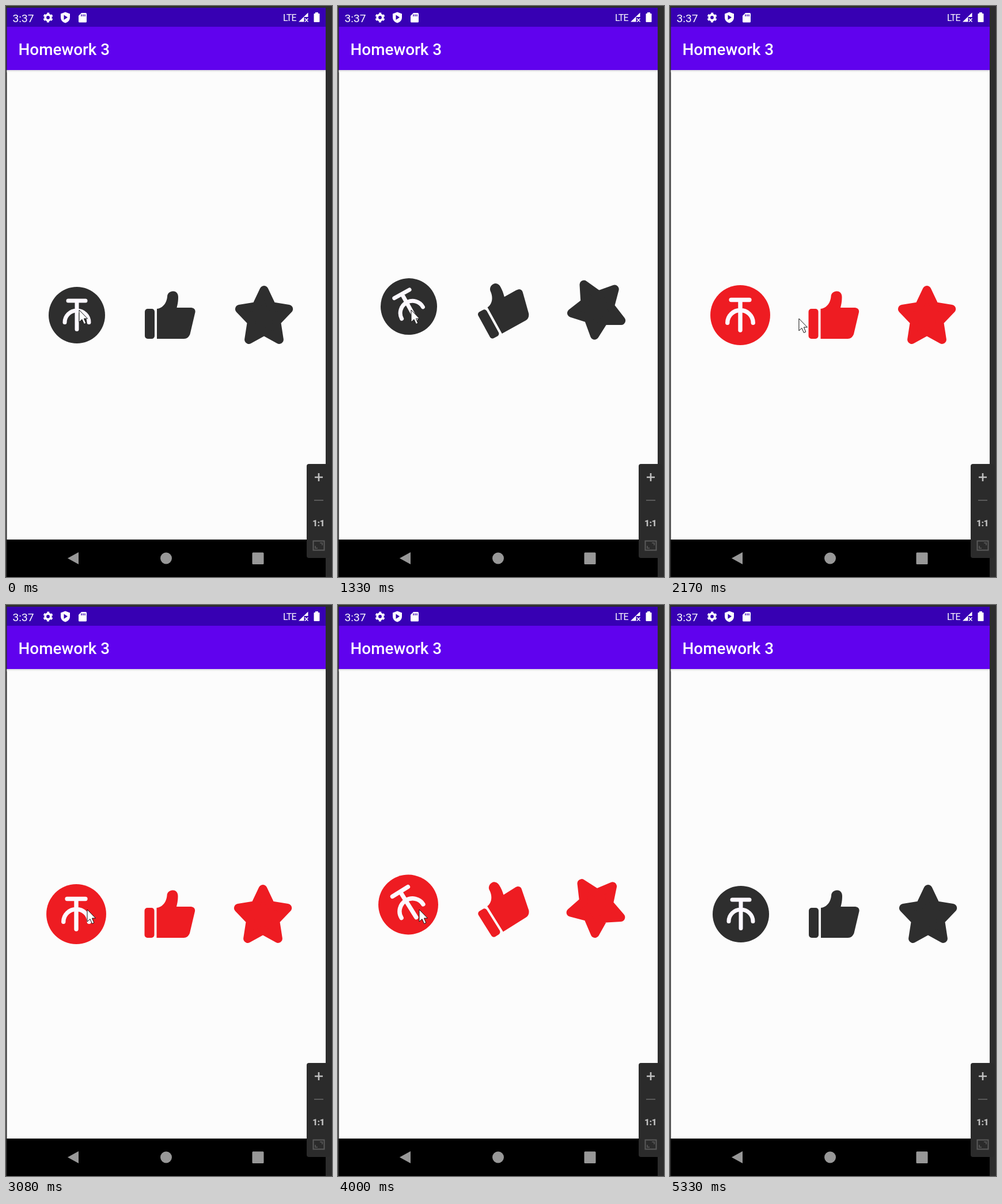
Write an HTML page that moves like this. It is 566 px wide and 990 px high and loops after 5580 ms.

```html
<!DOCTYPE html>
<html lang="en">
<head>
<meta charset="utf-8">
<style>
  html, body { margin: 0; height: 100%; overflow: hidden; background: #2d2d2d; }
  svg { display: block; width: 566px; height: 990px; font-family: Roboto, sans-serif; }
</style>
</head>
<body>
<svg viewBox="0 0 566 990">
  <defs>
    <linearGradient id="shade" x2="0" y2="1">
      <stop stop-color="#d9d9dc"/>
      <stop offset="1" stop-color="#fcfcfc"/>
    </linearGradient>
  </defs>

  <!-- Screen -->
  <rect x="1.500" y="3" width="553.500" height="33" fill="#3700b3"/>
  <rect x="1.500" y="36" width="553.500" height="75" fill="#6002ee"/>
  <rect x="1.500" y="111" width="553.500" height="814" fill="#fcfcfc"/>
  <rect x="1.500" y="111" width="553.500" height="4" fill="url(#shade)"/>
  <rect x="1.500" y="925.500" width="553.500" height="64.500"/>

  <!-- Status bar -->
  <g fill="#fff">
    <text x="11.500" y="27.500" font-size="19.200">3:37</text>
    <g fill="none" stroke="#fff">
      <circle cx="73" cy="20" r="4.800" stroke-width="3.800"/>
      <circle cx="73" cy="20" r="7.200" stroke-width="2.600" stroke-dasharray="3.8 3.74" stroke-dashoffset="5.670"/>
    </g>
    <path d="M103 10.500l8 3V19.500C111 24.500 108 28 103 29.500C98 28 95 24.500 95 19.500V13.500Z"/>
    <path d="M100.500 15.500L107 19.800L100.500 24Z" fill="#3700b3"/>
    <path d="M131 12h7.500q1.500 0 1.500 1.500v13.500q0 1.500-1.500 1.500h-11q-1.500 0-1.500-1.500V17Z"/>
    <path d="M131 14.500v3.500M134 14.500v3.500M137 14.500v3.500" stroke="#3700b3" stroke-width="1.400"/>
    <text x="481" y="26" font-size="16" letter-spacing="-.8">LTE</text>
    <path d="M508 27.500L524.500 11.500V19H517.500V27.500Z"/>
    <path d="M519 21.500l5.500 6m0-6l-5.500 6" stroke="#fff" stroke-width="1.500"/>
    <path d="M537 11h5v2h1.500q1 0 1 1v13q0 1-1 1h-8q-1 0-1-1v-13q0-1 1-1h1.500Z"/>
    <text x="21.500" y="84.500" font-size="27.900" font-weight="500">Homework 3</text>
  </g>

  <!-- Icons, each drawn around its own centre -->
  <g id="icons">
    <g>
      <circle r="49"/>
      <path d="M-15-25H15M0-25V24.500M-21 12.500A21 20.500 0 0 1 21 12.500"
            fill="none" stroke="#fcf8ff" stroke-width="7" stroke-linecap="round"/>
    </g>
    <g>
      <rect x="-44" y="-11" width="17" height="52" rx="5"/>
      <path d="M-23-11C-13-12-6-21-5-32C-5-38 0-41.500 5-41.500C11-41.500 14-37 14-31C14-24 13-19 11.500-13H35C42-13 45-9 43-3L34.500 33C32.500 38 29 41 24 41H-23Z"/>
    </g>
    <g><path id="star" stroke-width="15" stroke-linejoin="round"/></g>
  </g>

  <!-- Navigation bar -->
  <g fill="#989898">
    <path d="M107 957.500L126 947V968Z"/>
    <circle cx="278" cy="957.500" r="10"/>
    <rect x="427.500" y="947.500" width="20" height="20.500" rx="1.500"/>
  </g>

  <!-- Zoom panel -->
  <rect x="522" y="794" width="40.500" height="163" rx="4" fill="#2b2b2b"/>
  <g fill="none" stroke="#5a5a5a" stroke-width="2">
    <path d="M536 817h14M543 810v14" stroke="#c0c0c0" stroke-width="2.600"/>
    <path d="M535 857h16"/>
    <rect x="533.500" y="927.500" width="19" height="16"/>
    <path d="M537 936v4h4M545 931h4v4" stroke-width="1.600"/>
  </g>
  <text x="542.500" y="901.500" font-size="15.500" font-weight="900" fill="#c0c0c0" text-anchor="middle" letter-spacing="-.5">1:1</text>

  <path id="cursor" d="M0 0V21L5 16.500L8.500 24.500L11.800 23L8.500 15H14.500Z" fill="#fff" stroke="#111"/>
</svg>
<script>
const LOOP = 5580, STEP = 250 / 3;
const icons = document.getElementById('icons');
const cursor = document.getElementById('cursor');

// Star with rounded tips, a little taller than wide and below its pivot
document.getElementById('star').setAttribute('d', 'M' + Array.from({ length: 10 }, (_, i) => {
  const r = i % 2 ? 24 : 47.5, a = i * Math.PI / 5;
  return [0.945 * r * Math.sin(a), 4 - r * Math.cos(a)].map(v => v.toFixed(2));
}).join('L') + 'Z');

// Pointer path: time, x, y
const path = [
  [0, 127, 527], [1840, 127, 527], [2000, 160, 532], [2167, 224, 542],
  [2280, 238, 554], [2400, 205, 546], [2600, 141, 528], [4167, 141, 528],
  [4500, 301, 835], [4600, 301, 835], [4750, 392, 955], [4833, 402, 992], [LOOP, 402, 992]
];

function pointer(t) {
  const i = path.findIndex(p => p[0] > t);
  const [t0, x0, y0] = path[i - 1], [t1, x1, y1] = path[i];
  const k = (t - t0) / (t1 - t0);
  return [x0 + (x1 - x0) * k, y0 + (y1 - y0) * k];
}

// Smooth rise and fall from 0 to 1 and back
function hump(t, start, length) {
  const u = (t - start) / length;
  return u > 0 && u < 1 ? Math.sin(Math.PI * u) ** 2 : 0;
}

function draw(t) {
  const red = t > 1495 && t < 4160;
  const lift = 28 * hump(t, 860, 640) + (red ? 22 * hump(t, 3570, 645) : 0);
  const scale = 1 + 0.12 * hump(t, 1450, 600);
  const centers = red ? [122, 284.5, 446] : [123, 285, 448];
  const color = red ? '#ee1c22' : '#2e2e2e';
  icons.setAttribute('fill', color);
  icons.lastElementChild.setAttribute('stroke', color);
  [...icons.children].forEach((icon, i) => {
    const size = scale * (red && i === 0 ? 1.06 : 1);
    icon.setAttribute('transform',
      `translate(${centers[i]} ${536 - lift}) rotate(${-1.94 * lift}) scale(${size})`);
  });
  cursor.setAttribute('transform', `translate(${pointer(t)})`);
}

function tick() {
  const t = performance.now() % LOOP;
  draw(Math.min(Math.floor((t + 5) / STEP), 66) * STEP);
  requestAnimationFrame(tick);
}
tick();
</script>
</body>
</html>
```
